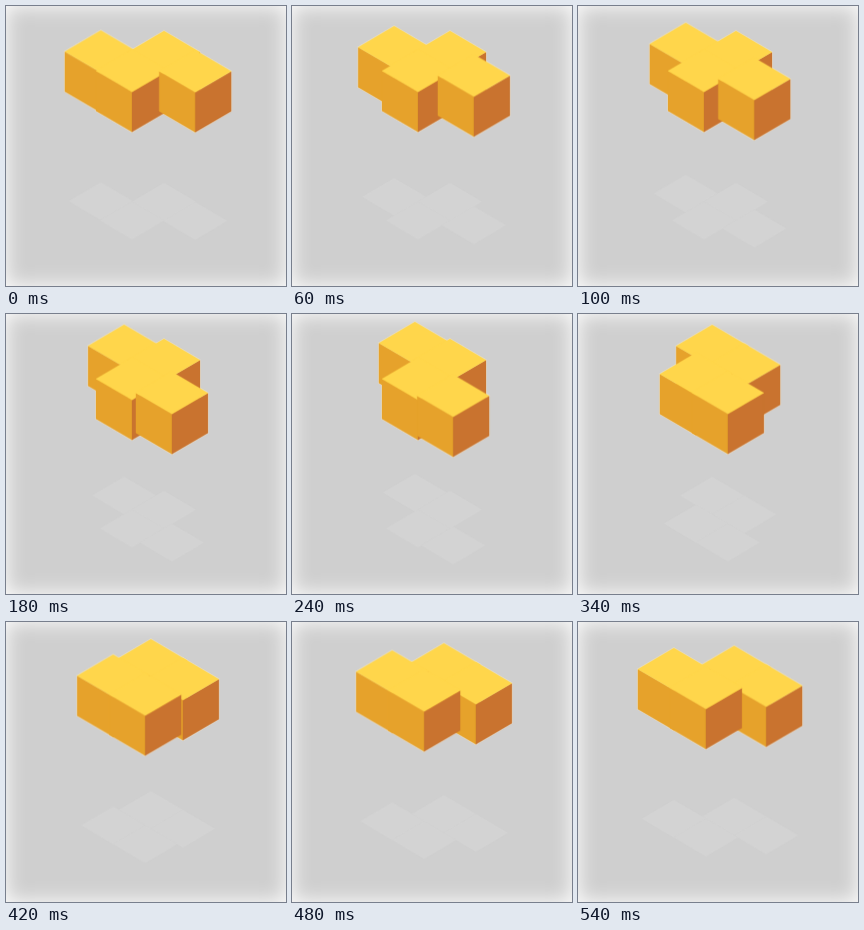
An HTML page that plays this animation: 280 by 280 pixels, repeating every 560 ms.

```html
<!DOCTYPE html>
<html lang="en">
<head>
<meta charset="utf-8">
<title>Sliding boxes</title>
<style>
  html, body { margin: 0; width: 100%; height: 100%; overflow: hidden; }
  body { background: #cfcfcf; box-shadow: inset 0 0 20px #fff; }
  svg { display: block; width: 100%; height: 100%; }
  .top { fill: #ffd64b; stroke: #ffd64b; }
  .left { fill: #e6a22b; stroke: #e6a22b; }
  .right { fill: #c9732f; stroke: #c9732f; }
  .top, .left, .right { stroke-width: .3; stroke-linejoin: round; }
  .rim { fill: none; stroke: #f6ecd8; stroke-width: 1.4; stroke-opacity: .6; }
  .shadow { fill: #d3d3d3; }
</style>
</head>
<body>
<svg viewBox="0 0 280 280"></svg>
<script>
const NS = 'http://www.w3.org/2000/svg';
const LOOP = 560, CELL = 32, SIZE = 36, HEIGHT = 40, SLOPE = 0.588;
const svg = document.querySelector('svg');

// Progress of one slide, as [time, distance]; each loop holds two slides.
const SLIDE = [
  [0, 0], [1 / 14, .03], [2 / 14, .145], [3 / 14, .25], [5 / 14, .425],
  [7 / 14, .585], [9 / 14, .75], [11 / 14, .86], [13 / 14, .94], [1, 1]
];

// Grid cells each box visits, listed from back to front.
const ROUTES = [
  [[0, 1], [0, 0], [1, 0]],
  [[1, 0], [1, 0], [2, 0]],
  [[1, 1], [1, 1], [0, 1]],
  [[2, 0], [2, 1], [1, 1]]
];

const iso = (x, y, z = 0) => [x - y, (x + y) * SLOPE + z];

const square = s => [iso(0, 0), iso(s, 0), iso(s, s), iso(0, s)];

const S = SIZE, H = HEIGHT;
const SHAPES = {
  top: square(S),
  left: [iso(0, S), iso(S, S), iso(S, S, H), iso(0, S, H)],
  right: [iso(S, S), iso(S, 0), iso(S, 0, H), iso(S, S, H)],
  rim: [iso(0, 0), iso(S, 0), iso(S, 0, H), iso(S, S, H), iso(0, S, H), iso(0, S)],
  shadow: square(CELL)
};

function add(parent, tag, attrs = {}) {
  const el = parent.appendChild(document.createElementNS(NS, tag));
  for (const name in attrs) el.setAttribute(name, attrs[name]);
  return el;
}

function keyframes(route) {
  return [0, 1].flatMap(half => {
    const [from, to] = [route[half], route[half + 1]];
    return SLIDE.slice(half).map(([t, p]) => {
      const [x, y] = iso(...from.map((v, i) => (v + (to[i] - v) * p) * CELL));
      return { offset: (half + t) / 2, transform: `translate(${x}px, ${y}px)` };
    });
  });
}

function layer(y, names) {
  const group = add(svg, 'g', { transform: `translate(126 ${y})` });
  for (const route of ROUTES) {
    const box = add(group, 'g');
    for (const name of names) {
      add(box, 'polygon', { class: name, points: SHAPES[name].join(' ') });
    }
    box.animate(keyframes(route), { duration: LOOP, iterations: Infinity });
  }
}

layer(158, ['shadow']);
layer(6, ['rim']);
layer(6, ['left', 'right', 'top']);
</script>
</body>
</html>
```
